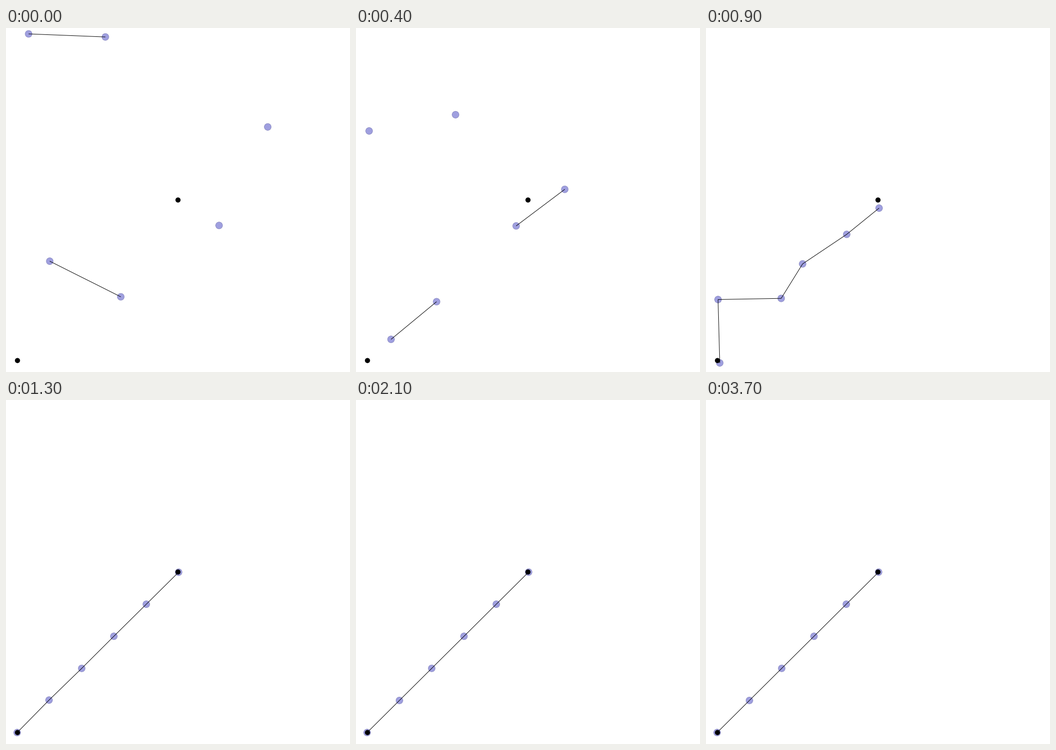
These frames come from a looping animation (700 by 700 pixels, 4000 ms). A matplotlib script:

```python
from itertools import combinations

import numpy as np
import matplotlib.pyplot as plt
from matplotlib.animation import FuncAnimation
from matplotlib.collections import LineCollection
from matplotlib.patches import Circle

SIZE, DPI = 700, 100
FRAMES, STEP = 40, 100
LINK = 165            # robots closer than this are joined
DECAY = 1.1           # settling rate per step
PX = 72 / DPI

ANCHORS = np.array([(SIZE / 30, SIZE * 29 / 30), (SIZE / 2, SIZE / 2)])

# Each robot flies a cubic through four points, then settles on the line
TIMES = [0, 2, 6, 9]
ROUTES = [
    [(89, 474.5), (83, 544), (55.5, 703), (28, 681.5)],
    [(46, 12), (39, 85), (17, 356), (24.5, 552.5)],
    [(233.6, 547), (184, 546.5), (159.8, 566), (153, 550.2)],
    [(202.2, 18.2), (208.1, 65), (194.4, 313.2), (196.6, 480)],
    [(433.6, 401.8), (377.5, 399.5), (289.4, 409.2), (286.3, 419.9)],
    [(532.6, 201.3), (485.4, 262), (371.8, 377), (352.2, 366.5)],
]
# The chain rests evenly spaced, its ends a little outside the anchors
GOALS = np.linspace(ANCHORS[0] + (-0.7, 0), ANCHORS[1] + (1.2, 0.2), len(ROUTES))
CUBICS = [np.polyfit(TIMES, route, 3) for route in ROUTES]


def position(i, step):
    flight = min(step, TIMES[-1])
    p = flight ** np.arange(3, -1, -1) @ CUBICS[i]
    return GOALS[i] + (p - GOALS[i]) * np.exp(-DECAY * (step - flight))


fig = plt.figure(figsize=(SIZE / DPI, SIZE / DPI), dpi=DPI, facecolor="white")
ax = fig.add_axes([0, 0, 1, 1])
ax.set_xlim(0, SIZE)
ax.set_ylim(SIZE, 0)
ax.axis("off")

robots = [ax.add_patch(Circle((0, 0), 7, fc="#9f9fdf", ec="#8585bd",
                              lw=0.8 * PX, zorder=1)) for _ in ROUTES]
links = ax.add_collection(LineCollection([], colors="black", linewidths=PX, zorder=2),
                          autolim=False)
for xy in ANCHORS:
    ax.add_patch(Circle(xy, 5.2, fc="black", ec="none", zorder=3))


def draw(step):
    pos = [position(i, step) for i in range(len(robots))]
    for robot, xy in zip(robots, pos):
        robot.center = xy
    links.set_segments([(a, b) for a, b in combinations(pos, 2)
                        if np.hypot(*(b - a)) < LINK])
    return [*robots, links]


anim = FuncAnimation(fig, draw, frames=FRAMES, interval=STEP,
                     init_func=lambda: draw(0), repeat=True, repeat_delay=0)
plt.show()
```
